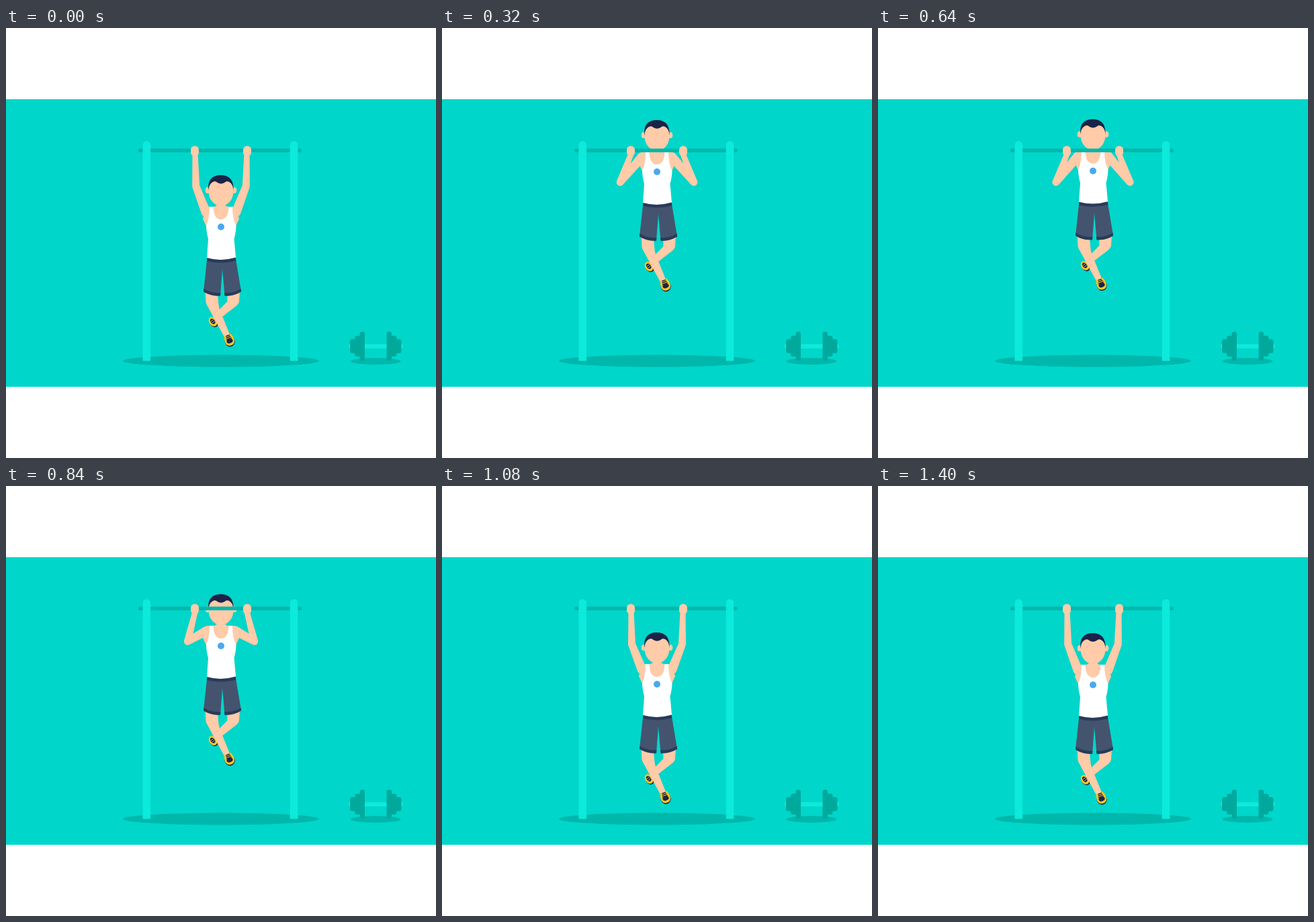
An HTML page for the animation above (1600 ms loop, 640 by 640 pixels).

```html
<!DOCTYPE html>
<html lang="en">
<head>
<meta charset="utf-8">
<title>Pull-ups</title>
<style>
  html, body { margin: 0; width: 100%; height: 100%; overflow: hidden; background: #fff; }
  svg { display: block; width: 100vw; height: 100vh; }
  .skin { fill: #ffcba8; }
  .navy { fill: #1a2348; }
  .yellow { fill: #ffc820; }
  .post { fill: #0ceadb; }
  .shade { fill: #00b7ab; }
  .trim { fill: #293b5a; }
</style>
</head>
<body>
<svg viewBox="0 0 640 640">
  <rect y="106" width="640" height="428" fill="#00d6ca"/>
  <ellipse class="shade" cx="320" cy="495.5" rx="146" ry="9"/>

  <!-- dumbbell -->
  <ellipse class="shade" cx="550" cy="496" rx="37.5" ry="5"/>
  <rect class="post" x="510" y="470.5" width="81" height="6.5" rx="2"/>
  <g id="plates" fill="#00a99c">
    <rect x="526.5" y="452" width="7.5" height="43" rx="3.5"/>
    <rect x="519" y="458" width="9" height="31" rx="3.5"/>
    <rect x="512" y="463" width="8.5" height="21" rx="3.5"/>
  </g>
  <use href="#plates" transform="translate(1100.5) scale(-1 1)"/>

  <path id="arm" class="skin"/>
  <use href="#arm" transform="translate(640) scale(-1 1)"/>

  <g id="body">
    <!-- back leg -->
    <path class="skin" d="M348 390L347 407Q346.500 411 341 415L315 435L309 428L329.500 407L329 390Z"/>
    <g transform="translate(308 437) rotate(-38)">
      <ellipse class="navy" cx="0" cy="1.300" rx="5.700" ry="8"/>
      <ellipse class="yellow" rx="5.700" ry="7.500"/>
      <ellipse class="navy" cy="-.5" rx="3" ry="4.500"/>
      <path d="M-2.500-2h5M-2.500 1h5" stroke="#ffe6c0" stroke-width=".7"/>
    </g>
    <!-- front leg -->
    <path class="skin" d="M296.500 390L297.500 408Q298 411 300 414L325 460L333 456L318 419Q315.500 411 315 390Z"/>
    <g transform="translate(332.500 464.500) rotate(-20)">
      <ellipse class="navy" cy="1.700" rx="7.500" ry="8.300"/>
      <path class="yellow" d="M-5-8.500Q0-6.500 5-8.500Q7.300-3 7.300 1Q6.500 8.300 0 8.300T-7.300 1Q-7.300-3-5-8.500Z"/>
      <ellipse class="navy" cy="1.500" rx="4.700" ry="3.300"/>
      <path d="M-3-7h6M-3.500-4.500h7M-4-2h8" stroke="#1a2348" stroke-width="1.500"/>
    </g>
    <!-- shorts -->
    <path fill="#44546f" d="M299.500 341H341.500L350 392Q339 399.500 325.500 398.500L322 359L319 398.500Q305 399.500 294 392Z"/>
    <path class="trim" d="M299.500 341H341.500L342.300 346.500Q320 352 299 347Z
      M294.500 388Q305 395 319.400 394L319 398.500Q305 399.500 294 392.500Z
      M349.500 388Q339 395 325 394L325.500 398.500Q339 399.500 350 392.500Z"/>
    <!-- torso -->
    <path class="skin" d="M314 255H326V263Q327 266 332 266H342L347 284L342 295H298L293 284L298 266H308Q313 266 314 263Z"/>
    <path fill="#fff" d="M303 266H308.500Q309 285 320 285T331.500 266H337Q337 284 342.500 294Q342.500 303 339.500 314L342 341.500Q320 348 299 342L301 314Q298 303 298 294Q303 284 303 266Z"/>
    <circle cx="320" cy="296" r="5" fill="#4aa9f0"/>
    <!-- head -->
    <g class="skin">
      <ellipse cx="300" cy="241.500" rx="3.300" ry="4.500"/>
      <ellipse cx="340" cy="241.500" rx="3.300" ry="4.500"/>
      <ellipse cx="320" cy="243" rx="18.500" ry="22"/>
    </g>
    <path class="navy" d="M301 242Q299.500 219 319.500 219T338.500 242Q338 232 332 229Q328 227 325.500 230Q320 233.500 314.500 230Q312 227 308 229Q302 232 301 242Z"/>
  </g>

  <rect class="shade" x="197" y="179.500" width="243" height="5.500" rx="2.700"/>
  <path class="post" d="M203.500 495.500V174a5.800 5.800 0 0 1 11.600 0V495.500ZM422.700 495.500V174a5.800 5.800 0 0 1 11.600 0V495.500Z"/>
  <rect class="skin" x="275" y="175.500" width="12" height="15.500" rx="5.800"/>
  <rect class="skin" x="353" y="175.500" width="12" height="15.500" rx="5.800"/>
</svg>
<script>
const LOOP = 1600, STEP = 40, LAST = 1400;
const arm = document.getElementById('arm'), body = document.getElementById('body');

// [time ms, height px, speed px/ms]
const keys = [
  [0, 0, 0], [160, -58, -.27], [320, -82, -.06], [440, -85.5, 0], [640, -83.3, .03],
  [840, -58, .27], [1080, -1, .11], [1190, 3.7, 0], [1400, 0, 0]
];

// Cubic Hermite interpolation of the body height.
function height(t) {
  const i = Math.max(1, keys.findIndex(k => k[0] >= t));
  const [t0, y0, v0] = keys[i - 1], [t1, y1, v1] = keys[i];
  const d = t1 - t0, u = (t - t0) / d, w = 1 - u;
  return w * w * ((1 + 2 * u) * y0 + u * d * v0) + u * u * ((3 - 2 * u) * y1 - w * d * v1);
}

// Tapered limb from a to b with round ends.
function limb([ax, ay], ra, [bx, by], rb) {
  const len = Math.hypot(bx - ax, by - ay);
  const nx = (by - ay) / len, ny = (ax - bx) / len;
  const at = (x, y, r) => `${x + nx * r} ${y + ny * r}`;
  return `M${at(ax, ay, ra)}L${at(bx, by, rb)}A${rb} ${rb} 0 0 1 ${at(bx, by, -rb)}` +
    `L${at(ax, ay, -ra)}A${ra} ${ra} 0 0 1 ${at(ax, ay, ra)}Z`;
}

function draw(now) {
  const t = Math.min(LAST, Math.floor(now % LOOP / STEP) * STEP);
  const y = height(t);
  const wrist = [281.5, 187], elbow = [282.7 + .213 * y, 235.5 + .073 * y], shoulder = [297.5, 274 + y];
  arm.setAttribute('d', limb(wrist, 4, elbow, 5.5) + limb(elbow, 5.5, shoulder, 7));
  body.setAttribute('transform', `translate(0 ${y})`);
}

function tick() {
  draw(performance.now());
  requestAnimationFrame(tick);
}
tick();
</script>
</body>
</html>
```
